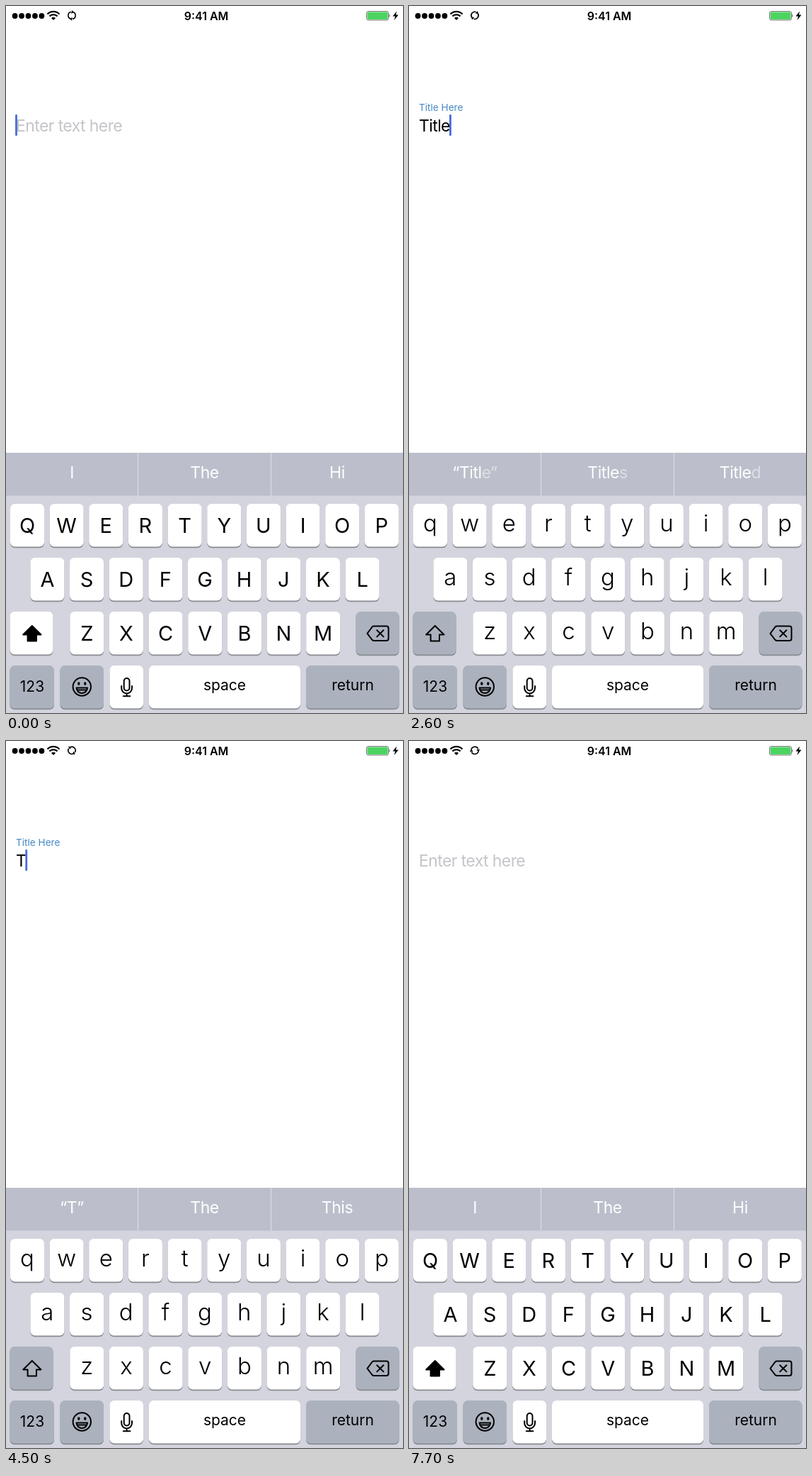
An HTML page that plays this animation: 561 by 997 pixels, repeating every 7800 ms.

```html
<!DOCTYPE html>
<html lang="en">
<head>
<meta charset="utf-8">
<title>Floating label text field</title>
<style>
  html, body { margin: 0; width: 100%; height: 100%; overflow: hidden; background: #fff; }
  svg { display: block; width: 100vw; height: 100vh; font-family: Inter, Roboto, "Liberation Sans", sans-serif; }
  .mid { text-anchor: middle; }
  .field { font-size: 23px; letter-spacing: -.6px; }
  .hint { font-size: 23px; letter-spacing: -.45px; fill: #fff; }
  .upper { font-size: 29px; }
  .lower { font-size: 33px; font-weight: 300; }
  .label { font-size: 21px; }
  .line { fill: none; stroke: #000; stroke-width: 2; stroke-linejoin: round; stroke-linecap: round; }
</style>
</head>
<body>
<svg viewBox="0 0 561 997">
  <rect width="561" height="997" fill="#fff"/>

  <g id="dots"></g>
  <g fill="none" stroke="#000" stroke-width="2.3">
    <path d="M58.5 11.5A12 12 0 0 1 75.5 11.5M61.4 14.4A8 8 0 0 1 72.6 14.4"/>
    <path d="M64 17A4.2 4.2 0 0 1 70 17L67 20Z" fill="#000" stroke="none"/>
  </g>
  <g id="sync">
    <g id="half">
      <path d="M-5.1 -.8A5.2 5.2 0 0 1 4.6 -2.4" fill="none" stroke="#000" stroke-width="1.6"/>
      <path d="M2.3 -1.6L7.2 -1.6L5 1.8Z"/>
    </g>
    <use href="#half" transform="rotate(180)"/>
  </g>
  <text class="mid" x="283" y="20" font-size="16" font-weight="600">9:41 AM</text>
  <rect x="509.5" y="7.5" width="31" height="12.5" rx="2.5" fill="#fff" stroke="#777" stroke-width="1"/>
  <rect x="510.5" y="8.5" width="29" height="10.5" rx="1.5" fill="#4cd461"/>
  <path d="M541.5 11.5Q543.5 13.7 541.5 16Z" fill="#444"/>
  <path d="M552 7.5L546.5 14.5H550L548.5 20L554.5 12.5H551Z"/>

  <text id="caption" x="14" y="147.5" font-size="13.6" fill="#4688c4">Title Here</text>
  <text id="placeholder" class="field" x="14" y="177" fill="#c5c5ca">Enter text here</text>
  <text id="value" class="field" x="14" y="177"></text>
  <rect id="caret" y="153" width="2.8" height="30" rx="1" fill="#456cdb"/>

  <rect y="690" width="561" height="307" fill="#d3d4dd"/>
  <rect y="630" width="561" height="60.5" fill="#bcbfcb"/>
  <path d="M186.5 630V690.5M374.5 630V690.5" stroke="#d9dbe3" stroke-width="1.3"/>
  <g id="hints"></g>
  <g id="keys"></g>

  <path id="arrow" class="line" d="M36.8 874L49.5 886.5H43V895.5H30.6V886.5H24.2Z"/>
  <path id="eraser" class="line" d="M520 874.5H537.5Q540.5 874.5 540.5 877.5V892Q540.5 895 537.5 895H520Q518.5 895 517.5 894L510.5 884.8L517.5 875.5Q518.5 874.5 520 874.5Z"/>
  <path id="cross" class="line" d="M524.2 880.2L533.4 889.4M533.4 880.2L524.2 889.4"/>

  <circle class="line" cx="107.3" cy="960" r="12.7"/>
  <ellipse cx="102.8" cy="955.6" rx="1.7" ry="2.4"/>
  <ellipse cx="111.8" cy="955.6" rx="1.7" ry="2.4"/>
  <path class="line" d="M99.5 961.5H115.1Q113.8 969 107.3 969T99.5 961.5Z" stroke-width="1.8"/>
  <path class="line" d="M101 964.4H113.6" stroke-width="1.4"/>

  <rect class="line" x="166.7" y="948" width="7.8" height="17.5" rx="3.9"/>
  <path class="line" d="M163.2 959V962A7.4 7.4 0 0 0 178 962V959M170.6 969.5V973.3M165.8 973.3H175.4"/>
</svg>

<script>
const LOOP = 7800, TICK = 100;
const $ = id => document.getElementById(id);
const clamp = v => Math.max(0, Math.min(1, v));

function add(parent, tag, attrs, text = "") {
  const el = document.createElementNS("http://www.w3.org/2000/svg", tag);
  for (const name in attrs) el.setAttribute(name, attrs[name]);
  el.textContent = text;
  return parent.appendChild(el);
}

// Each edit: when it happens and what the field then holds.
const edits = [
  [-250, ""], [1300, "T"], [1600, "Ti"], [1900, "Tit"], [2200, "Titl"], [2500, "Title"],
  [3500, "Titl"], [3700, "Tit"], [4000, "Ti"], [4300, "T"], [4700, ""]
].map(([at, text]) => ({ at, text }));
const firstLetter = 1300, emptied = 4700;

const guesses = {
  "": ["I", "The", "Hi"],
  T: ["“T”", "The", "This"],
  Ti: ["“Ti”", "Time", "Times"],
  Tit: ["“Tit”", "Title", "Titan"],
  Titl: ["“Titl”", "Title", "Titles"],
  Title: ["“Title”", "Titles", "Titled"]
};

for (let i = 0; i < 5; i++) add($("dots"), "circle", { cx: 12.6 + 9.45 * i, cy: 14, r: 3.9 });

const hints = [93, 280.5, 468].map(x => {
  const text = add($("hints"), "text", { class: "hint mid", x, y: 666 });
  return { kept: add(text, "tspan", {}), fresh: add(text, "tspan", {}) };
});

const GRAY = "#abb2be";
function key(x, y, width, fill = "#fff") {
  add($("keys"), "rect", { x, y: y + 1.7, width, height: 60.5, rx: 6.5, fill: "#898b91" });
  return add($("keys"), "rect", { x, y, width, height: 60.5, rx: 6.5, fill });
}

const letters = [];
[["QWERTYUIOP", 30], ["ASDFGHJKL", 58.4], ["ZXCVBNM", 114.3]].forEach(([row, first], r) => {
  [...row].forEach((letter, i) => {
    const x = first + 55.65 * i, y = 702 + 76 * r;
    key(x - 24, y, 48);
    letters.push({ letter, y, el: add($("keys"), "text", { x }) });
  });
});

const shiftKey = key(5.5, 854, 61);
const eraseKey = key(494.5, 854, 61, GRAY);
key(5.5, 930, 62.5, GRAY);
key(76.5, 930, 61.5, GRAY);
key(146.5, 930, 47.5);
key(202, 930, 214);
key(424, 930, 131.5, GRAY);
[["123", 37, 967], ["space", 309, 965], ["return", 490, 965]]
  .forEach(([text, x, y]) => add($("keys"), "text", { class: "label mid", x, y }, text));

let shownCase = null;
function setCase(upper) {
  if (upper === shownCase) return;
  shownCase = upper;
  for (const { letter, y, el } of letters) {
    el.textContent = upper ? letter : letter.toLowerCase();
    el.setAttribute("class", upper ? "upper mid" : "lower mid");
    el.setAttribute("y", y + (upper ? 41 : 39));
  }
  shiftKey.setAttribute("fill", upper ? "#fff" : GRAY);
  $("arrow").style.fill = upper ? "#000" : "none";
}

function commonPrefix(a, b) {
  let n = 0;
  while (n < a.length && a[n] === b[n]) n++;
  return n;
}

function render(time) {
  const t = Math.floor(time / TICK) * TICK;
  const index = edits.findLastIndex(e => e.at <= t);
  const { at, text } = edits[index];
  const before = index ? edits[index - 1].text : "";
  const since = t - at;

  $("sync").setAttribute("transform", `translate(93 13.3) rotate(${105 + t * 0.15})`);

  $("value").textContent = text;
  $("placeholder").style.opacity = text ? 0 : 1;
  $("caret").setAttribute("x", 13.1 + (text ? $("value").getComputedTextLength() : 0));
  const blinkOff = since >= 700 && (since + 300) % 1000 < 500;
  $("caret").style.opacity = blinkOff ? 0 : 1;

  const rise = clamp((t - firstLetter) / 300) * (1 - clamp((t - emptied) / 300));
  $("caption").style.opacity = rise;
  $("caption").setAttribute("transform", `translate(0 ${10 * (1 - rise)})`);

  // Letters shared with the previous guess stay; the rest fades in.
  const fade = clamp(since / 200);
  hints.forEach(({ kept, fresh }, i) => {
    const old = guesses[before][i];
    const word = fade ? guesses[text][i] : old;
    const n = fade ? commonPrefix(old, word) : word.length;
    kept.textContent = word.slice(0, n);
    fresh.textContent = word.slice(n);
    fresh.setAttribute("fill-opacity", fade);
  });

  setCase(!text);
  const erasing = text.length < before.length && since < 200;
  eraseKey.setAttribute("fill", erasing ? "#fff" : GRAY);
  $("eraser").style.fill = erasing ? "#000" : "none";
  $("cross").style.stroke = erasing ? "#fff" : "#000";
}

const start = performance.now();
function frame() {
  render((performance.now() - start) % LOOP);
  requestAnimationFrame(frame);
}
frame();
</script>
</body>
</html>
```
